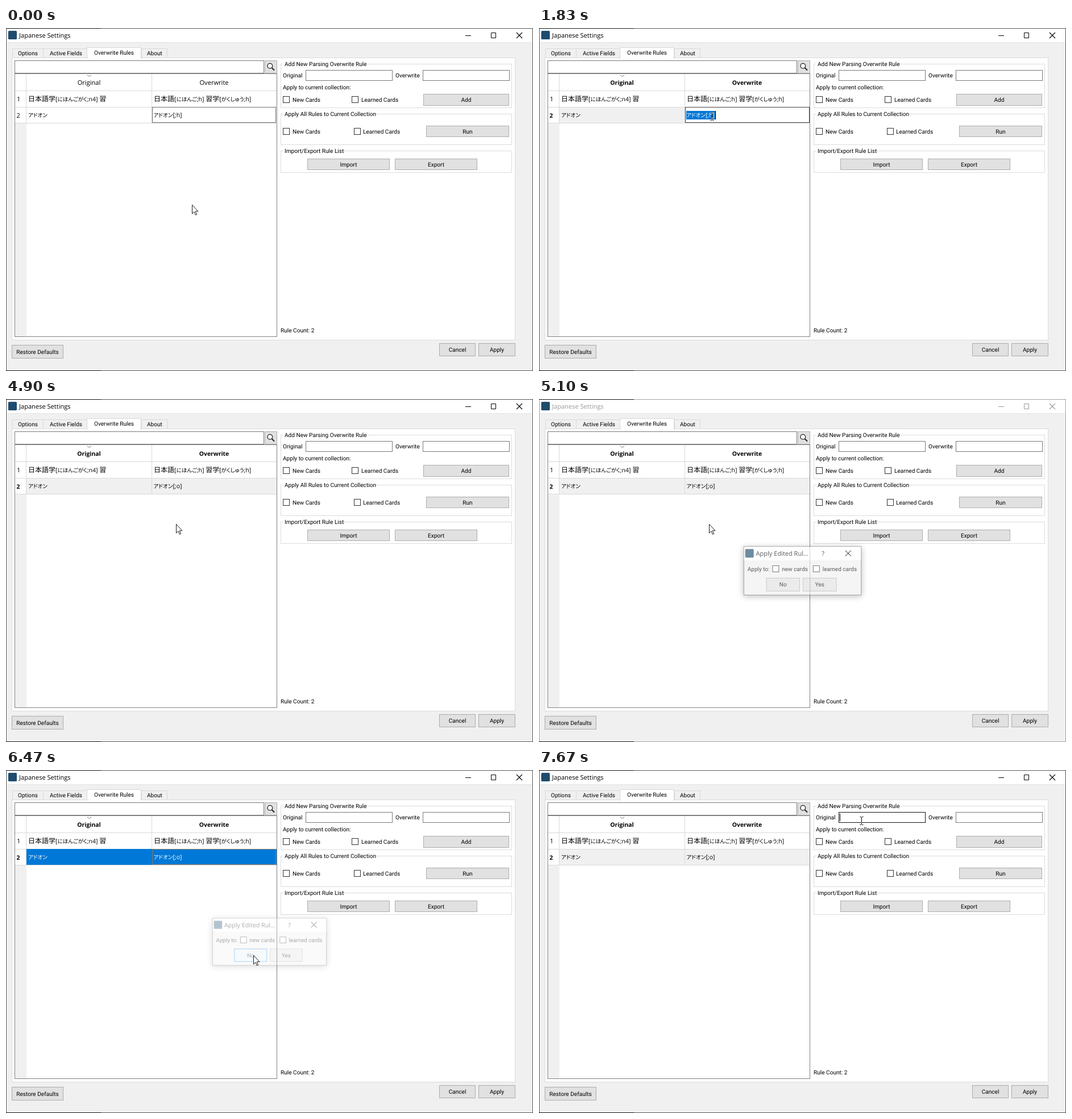
An HTML page for the animation above (8 s loop, 927 px wide and 604 px high).

```html
<!DOCTYPE html>
<html lang="en">
<head>
<meta charset="utf-8">
<title>Japanese Settings</title>
<style>
html, body { margin: 0; width: 100%; height: 100%; overflow: hidden; background: #f0f0f0; }
svg { display: block; width: 100%; height: 100%; }
text { font: 10.1px Roboto, sans-serif; text-rendering: geometricPrecision; white-space: pre; }
.ui { font: 11.1px "Open Sans", sans-serif; }
.bold { font: bold 10.4px "Open Sans", sans-serif; }
.cell { font: 10.5px "Open Sans", sans-serif; }
.kanji { font: 12px "Noto Sans CJK JP", "Noto Sans CJK", sans-serif; }
.kana { font: 9.6px "Noto Sans CJK JP", "Noto Sans CJK", sans-serif; font-feature-settings: "palt"; }
.mid { text-anchor: middle; }
.beam { mix-blend-mode: difference; }
</style>
</head>
<body>
<svg viewBox="0 0 927 604"><g id="base"></g><g id="live"></g></svg>
<script>
const LOOP = 8000;
const BLUE = '#0078d7', LOGO = '#1d4c6e', GRID = '#d9d9d9';

// Drawing helpers
const fill = (x, y, w, h, color) => `<rect x="${x}" y="${y}" width="${w}" height="${h}" fill="${color}"/>`;
const box = (x1, y1, x2, y2, color, stroke) =>
  `<rect x="${x1 + .5}" y="${y1 + .5}" width="${x2 - x1}" height="${y2 - y1}" fill="${color}" stroke="${stroke}"/>`;
const path = (d, stroke = '#000', extra = '') => `<path d="${d}" fill="none" stroke="${stroke}" ${extra}/>`;
const text = (x, y, s, cls = '', color = '#000') => `<text x="${x}" y="${y}" class="${cls}" fill="${color}">${s}</text>`;
const japanese = (x, y, s, color) => text(x, y, s
  .replace(/[\u4e00-\u9fff]+/g, '<tspan class="kanji">$&</tspan>')
  .replace(/[\u3040-\u30ff]+/g, '<tspan class="kana">$&</tspan>'), 'cell', color);
const button = (x1, y1, x2, y2, label, color = '#e1e1e1', stroke = '#adadad') =>
  box(x1, y1, x2, y2, color, stroke) + text((x1 + x2 + 1) / 2, (y1 + y2) / 2 + 4, label, 'mid');
const check = (x, y, label, gap = 17, size = 12) =>
  box(x, y, x + size - 1, y + size - 1, '#fff', '#333') + text(x + gap, y + 10, label);
const group = (y1, y2, label, width) =>
  box(483, y1, 889, y2, 'none', '#dcdcdc') + fill(488, y1 - 1, width, 3, '#fff') + text(490, y1 + 4, label);
const logo = (x, y) => `<rect x="${x}" y="${y}" width="15" height="15" rx="1.5" fill="${LOGO}"/>`;
const cross = (x, y, color) => path(`M${x},${y}l10,10m0,-10l-10,10`, color, 'stroke-width="1.1"');

function base() {
  const tab = (x1, x2, tx, label) => box(x1, 36, x2, 52, '#f0f0f0', GRID) + text(tx, 48, label);
  return fill(0, 0, 927, 604, '#f0f0f0') + fill(0, 0, 927, 25, '#fff') + fill(0, 25, 927, 1, '#e4e4e4')
    + logo(4, 5)
    + tab(11, 65, 21, 'Options') + tab(65, 142, 77, 'Active Fields') + tab(238, 283, 248, 'About')
    + box(10, 52, 895, 549, '#fff', '#dcdcdc')
    + box(142, 34, 237, 53, '#fff', GRID) + fill(143, 51, 94, 4, '#fff') + text(155, 47, 'Overwrite Rules')
    // search bar
    + box(15, 57, 453, 79, '#fff', '#7a7a7a') + box(455, 57, 476, 79, '#e1e1e1', '#adadad')
    + '<circle cx="464.3" cy="66.8" r="4.4" fill="#f4f8fa" stroke="#222" stroke-width="1.3"/>'
    + path('M467.5,70l4.5,4.5', '#222', 'stroke-width="2"')
    // rule table
    + box(15, 80, 476, 543, '#fff', '#828282') + fill(16, 168, 20, 375, '#f0f0f0')
    + path('M16,110.5H476M16,139.5H476M16,167.5H476M35.5,81V168M256.5,81V168', GRID)
    + path('M143,83l3.5,2.5l3.5,-2.5', '#777')
    + text(19, 129, '1', 'ui')
    + japanese(39, 129, '日本語学[にほんごがく;n4] 習') + japanese(260, 129, '日本語[にほんご;h] 習学[がくしゅう;h]')
    // rule forms
    + group(63, 140, 'Add New Parsing Overwrite Rule', 148)
    + text(487, 87, 'Original') + text(685, 87, 'Overwrite') + box(733, 74, 885, 92, '#fff', '#7a7a7a')
    + text(487, 108, 'Apply to current collection:')
    + check(487, 120, 'New Cards') + check(608, 120, 'Learned Cards') + button(734, 116, 884, 136, 'Add')
    + group(151, 205, 'Apply All Rules to Current Collection', 163)
    + check(487, 176, 'New Cards') + check(612, 176, 'Learned Cards', 16) + button(739, 172, 884, 191, 'Run')
    + group(216, 254, 'Import/Export Rule List', 106)
    + button(530, 230, 674, 249, 'Import') + button(684, 230, 828, 249, 'Export')
    + text(483, 536, 'Rule Count: 2')
    + button(10, 558, 100, 581, 'Restore Defaults')
    + button(762, 555, 825, 577, 'Cancel') + button(831, 555, 895, 577, 'Apply');
}

// Pointer hot spot: time, x, y
const POINTER = [
  [570, 327, 311], [620, 330, 309], [750, 325, 270], [880, 309, 195], [1000, 299, 152],
  [1540, 299, 152], [1570, 303, 154], [1800, 303, 154], [1830, 304, 155], [1940, 304, 155],
  [2030, 307, 155], [2140, 307, 155], [2230, 309, 155], [4440, 309, 155], [4570, 299, 220],
  [5150, 299, 220], [5300, 315, 235], [5700, 394, 303], [5830, 421, 322], [5930, 431, 329],
  [6070, 431, 330], [6450, 431, 330], [6700, 480, 280], [6970, 520, 209], [7170, 548, 169],
  [7400, 565, 95], [7530, 567, 89]
];
const clamp = v => Math.min(1, Math.max(0, v));
const ramp = (t, from, to) => clamp((t - from) / (to - from));
const during = (t, from, to) => t >= from && t < to;

function pointerAt(t) {
  const i = POINTER.findIndex(k => k[0] > t);
  if (i < 1) return POINTER.at(i).slice(1);
  const a = POINTER[i - 1], b = POINTER[i], p = ramp(t, a[0], b[0]);
  return [1, 2].map(n => Math.round(a[n] + (b[n] - a[n]) * p));
}

function frame(t) {
  const modal = during(t, 4930, 6400);
  const color = modal ? '#999' : '#000', edge = modal ? '#a0a0a0' : '#555';
  return path('M0,.5H927M.5,0V604M926.5,0V604M0,603.5H927', edge)
    + path('M0,.5H167M0,603.5H167', '#111')
    + text(23, 17, 'Japanese Settings', 'ui', color)
    + path('M808,13.5h10M853.5,8.5h8v9h-8z', color) + cross(898, 8, color);
}

function editor(t) {
  const selected = t < 2370;
  const ending = t < 3370 ? '[;h]' : t < 3730 ? '[;]' : '[;o]';
  const caret = selected ? 310 : t < 3370 ? 306 : t < 3730 ? 300 : 307;
  const caretOn = !during(t, 2530, 3070) && t < 4330;
  return box(257, 139, 475, 166, '#fff', '#444')
    + (selected ? fill(259, 146, 51, 15, BLUE) : '')
    + japanese(259, 157, 'アドオン' + ending, selected ? '#fff' : '#000')
    + (caretOn ? fill(caret, 146, 1, 15, '#000') : '');
}

function table(t) {
  const touched = t >= 1300, editing = during(t, 1470, 4900);
  const blue = during(t, 1300, 1470) || during(t, 6400, 7670);
  const ink = blue ? '#fff' : '#000';
  const head = touched ? 'bold' : 'ui';
  let s = text(146, 100, 'Original', head + ' mid') + text(366, 100, 'Overwrite', head + ' mid')
    + text(18.5, 157.5, '2', head);
  if (touched) {
    s += fill(36, 140, 220, 27, blue ? BLUE : '#f0f0f0');
    s += fill(257, 140, 219, 27, blue ? BLUE : '#f0f0f0');
    if (blue) s += fill(36, 139, 440, 1, BLUE) + fill(256, 139, 1, 28, BLUE);
  }
  s += japanese(39, 157, 'アドオン', ink);
  if (editing) return s + editor(t);
  if (!touched || blue) s += box(257, 139, 474, 166, 'none', blue ? '#877868' : '#707070');
  return s + japanese(259.5, 157, 'アドオン' + (t < 4900 ? '[;h]' : '[;o]'), ink);
}

function dialog(t) {
  if (!during(t, 4940, 6520)) return '';
  const open = ramp(t, 4940, 5190), close = ramp(t, 6370, 6520);
  const scale = .92 + .08 * (1 - (1 - open) ** 2.3) - .08 * close * close;
  const hover = ramp(t, 5780, 6080);
  const mix = (a, b) => `rgb(${a.map((v, i) => Math.round(v + (b[i] - v) * hover))})`;
  return `<g opacity="${open * (1 - close)}" transform="translate(463.5 303) scale(${scale}) translate(-463.5 -303)">`
    + '<g style="filter:drop-shadow(0 2px 6px rgba(0,0,0,.4))">' + box(359, 259, 567, 345, '#f0f0f0', '#666') + '</g>'
    + fill(360, 260, 207, 24, '#fff') + logo(362, 264)
    + text(381, 276, 'Apply Edited Rul...', 'ui') + text(500, 276, '?', 'ui mid') + cross(539.5, 266.5, '#000')
    + text(366, 303, 'Apply to:') + check(410, 293, 'new cards') + check(482, 293, 'learned cards', 17)
    + button(399, 315, 458, 338, 'No', mix([225, 225, 225], [229, 241, 251]), mix([173, 173, 173], [0, 120, 215]))
    + button(464, 315, 523, 338, 'Yes') + '</g>';
}

function pointer(t) {
  const [x, y] = pointerAt(t);
  const overInput = y < 93;
  const beam = during(t, 1570, 4480) || overInput;
  const shape = beam
    ? path('M-2.5,-6.5h2l1,1l1,-1h2M.5,-6V7M-2.5,7.5h2l1,-1l1,1h2', '#fff', 'class="beam"')
    : '<path d="M.5,.5V16L4,12.7L6.4,18.3L8.6,17.3L6.2,11.8H11Z" fill="#fff" stroke="#000" stroke-width=".9"/>';
  return box(527, 74, 679, 92, '#fff', overInput ? '#111' : '#7a7a7a')
    + (t >= 7670 ? fill(529, 77, 1, 13, '#000') : '')
    + dialog(t)
    + `<g transform="translate(${x} ${y})"${beam ? ' class="beam"' : ''}>${beam ? shape.replace(' class="beam"', '') : shape}</g>`;
}

const live = document.getElementById('live');
document.getElementById('base').innerHTML = base();

function tick() {
  const t = performance.now() % LOOP;
  live.innerHTML = frame(t) + table(t) + pointer(t);
  requestAnimationFrame(tick);
}
tick();
</script>
</body>
</html>
```
